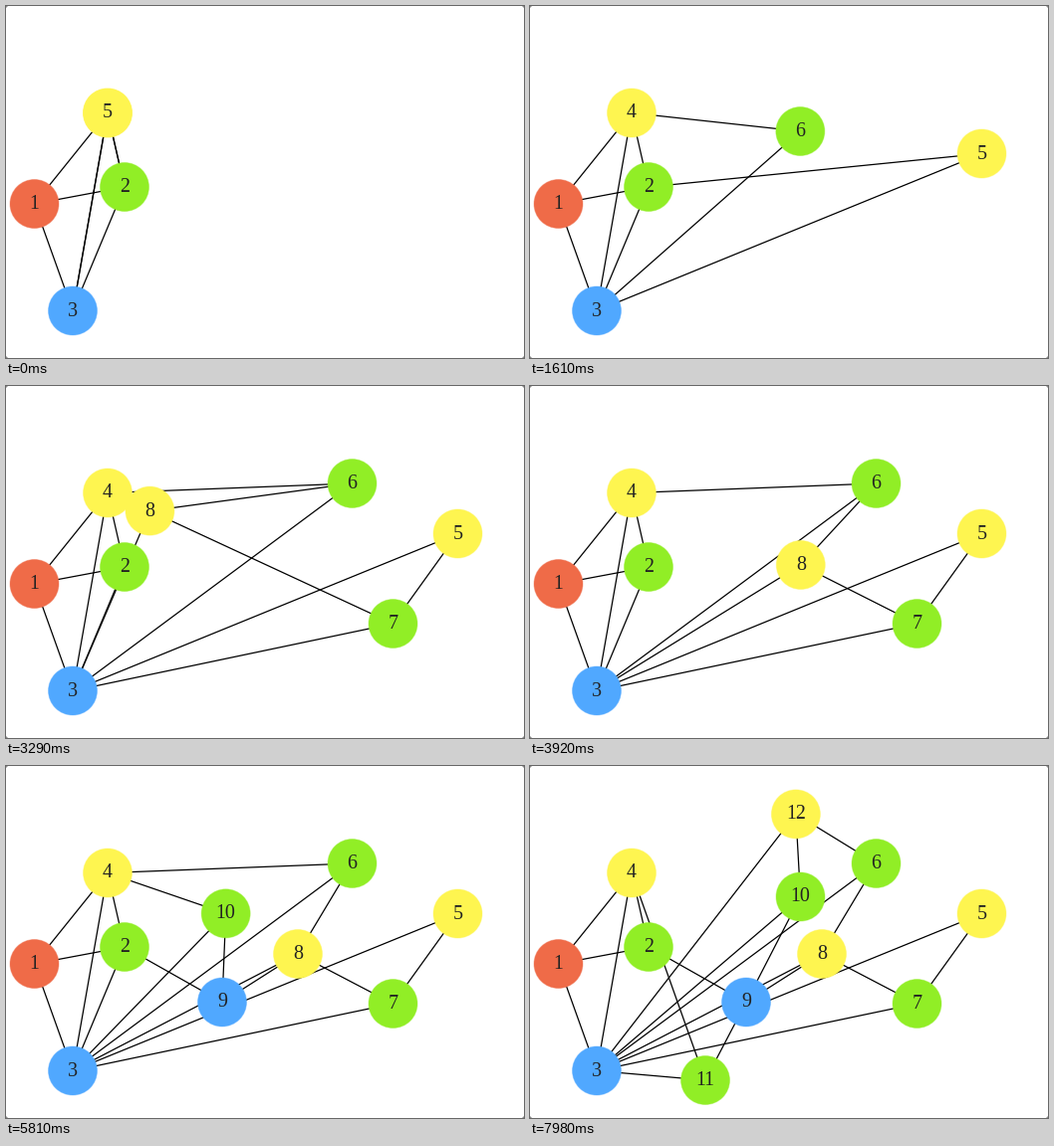
A matplotlib script that plays this animation: 520x354 px, repeating every 8 s.

```python
import math
from itertools import combinations

import matplotlib.pyplot as plt
from matplotlib.animation import FuncAnimation
from matplotlib.collections import LineCollection
from matplotlib.colors import to_rgba
from matplotlib.patches import Circle, Polygon

W, H, DPI = 520, 354, 100
LOOP, INTERVAL, STEP = 8000, 20, 70
RADIUS, FONT = 24.5, 20
MOVES = 9           # equal moves that carry a new node to its place
TICKS = MOVES + 1   # plus one tick at rest on top of its parent
TICK_RATE = 0.6675  # ticks per visible step
HUB = 3             # every node links to the hub, unless it has its colour


class Node:
    def __init__(self, place, color, parent=None, links=(), drops=()):
        self.place, self.color, self.parent = place, color, parent
        self.links, self.drops = set(links), set(drops)


nodes = {
    1: Node((28.5, 199), "#ef6b48"),
    2: Node((119, 182), "#91ee26"),
    3: Node((67, 306.5), "#50a8ff"),
    4: Node((102, 107.5), "#fef550"),
}
FIRST = len(nodes)


def split(parent, place, ties, drops=()):
    """Grow a node out of its parent, which may give up some edges."""
    links = set(ties) | ({HUB} - {parent})
    color = nodes[parent].color
    nodes[len(nodes) + 1] = Node(place, color, parent, links, drops)


split(4, (453.5, 148.5), ties=[2])
split(2, (347.5, 98), ties=[4])
split(2, (388.5, 239), ties=[4, 5], drops=[5])
split(4, (293, 189), ties=[6, 7], drops=[7])
split(3, (217, 237.5), ties=[2, 8])
split(2, (271.5, 131.5), ties=[4, 9])
split(2, (176, 316), ties=[4, 9], drops=[HUB])
split(4, (314, 31.5), ties=[6, 10], drops=[6, 10])


def px(n):
    return n * 72 / DPI


def mix(a, b, f):
    return tuple(p + (q - p) * f for p, q in zip(a, b))


def state(tick):
    """Node places and edges at a tick."""
    pos = {n: nodes[n].place for n in range(1, FIRST + 1)}
    edges = {frozenset(pair) for pair in combinations(pos, 2)}
    for n in range(FIRST + 1, len(nodes) + 1):
        age = tick - (n - FIRST - 1) * TICKS
        if age < 0:
            break
        node = nodes[n]
        pos[n] = mix(pos[node.parent], node.place, min(age / MOVES, 1))
        edges -= {frozenset((node.parent, m)) for m in node.drops}
        edges |= {frozenset((n, m)) for m in node.links}
    return pos, edges


fig = plt.figure(figsize=(W / DPI, H / DPI), dpi=DPI, facecolor="white")
ax = fig.add_axes([0, 0, 1, 1])
ax.set_xlim(0, W)
ax.set_ylim(H, 0)
ax.axis("off")

# rounded window corners
for cx, dx in ((0, 2), (W, -2)):
    for cy, dy in ((0, 2), (H, -2)):
        ax.add_patch(Polygon([(cx, cy), (cx + dx, cy), (cx, cy + dy)],
                             fc="#8a8a8a", ec="none"))

lines = LineCollection([], colors="black", linewidths=px(1.25), zorder=1)
ax.add_collection(lines, autolim=False)

discs, labels = {}, {}
for n, node in nodes.items():
    discs[n] = ax.add_patch(Circle((0, 0), RADIUS, fc=node.color,
                                   ec=to_rgba(node.color, 0.4),
                                   lw=px(1), zorder=2 + n))
    labels[n] = ax.text(0, 0, str(n), family="Liberation Serif",
                        size=px(FONT), color="#222222", ha="center",
                        va="baseline", zorder=2.5 + n)


def draw(frame):
    step = (frame * INTERVAL + INTERVAL // 2) // STEP
    pos, edges = state(math.floor(TICK_RATE * step + 0.99))
    lines.set_segments([[pos[n] for n in sorted(e)]
                        for e in sorted(edges, key=sorted)])
    for n in nodes:
        shown = n in pos
        discs[n].set_visible(shown)
        labels[n].set_visible(shown)
        if shown:
            x, y = pos[n]
            discs[n].center = x, y
            labels[n].set_position((x, y + FONT / 4))
    return [lines, *discs.values(), *labels.values()]


def init():
    return draw(0)


anim = FuncAnimation(fig, draw, frames=LOOP // INTERVAL, init_func=init,
                     interval=INTERVAL, repeat=True, repeat_delay=0)
plt.show()
```
